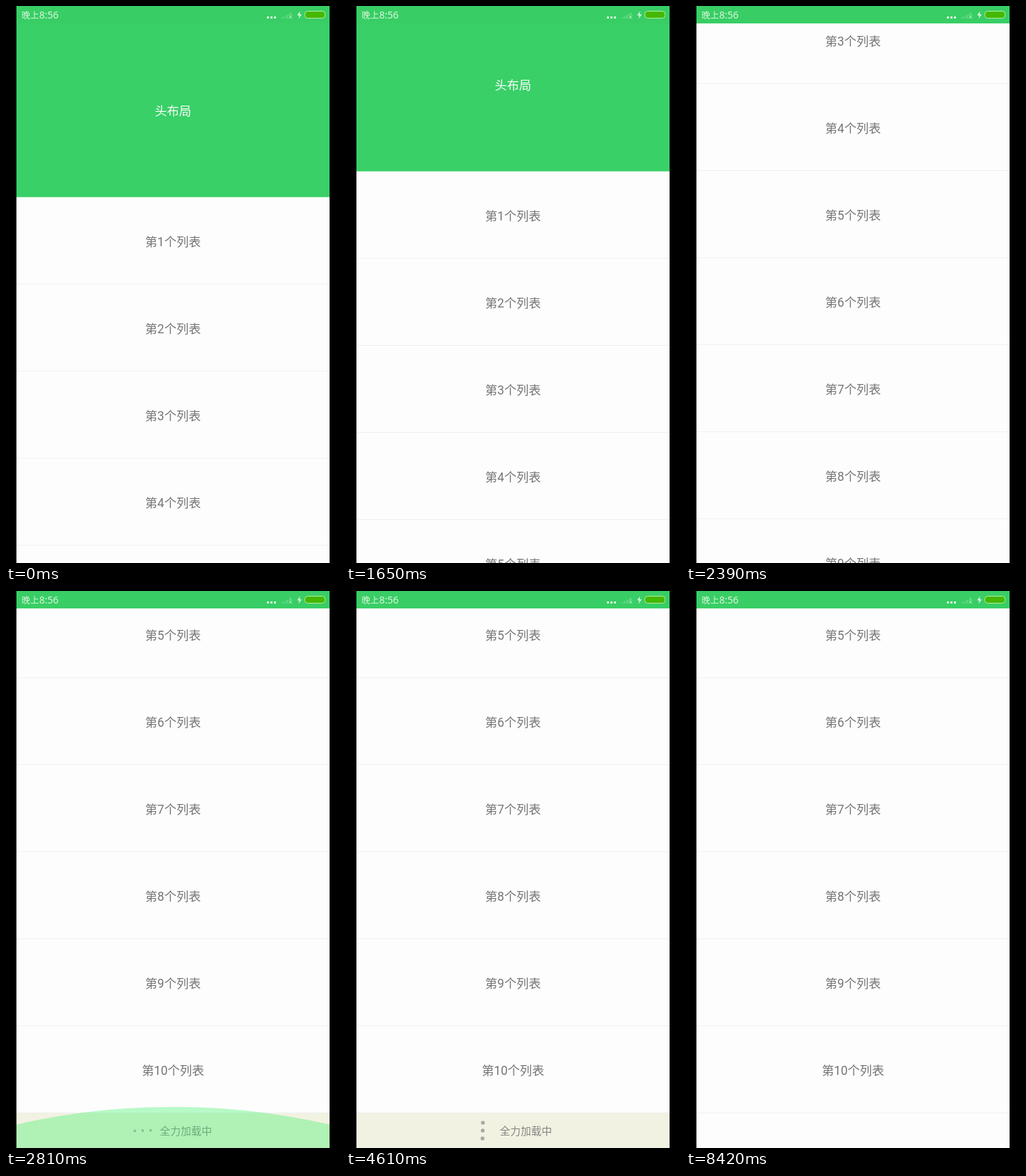
An HTML page for the animation above (8.45 s loop, 480 by 800 pixels).

```html
<!DOCTYPE html>
<html lang="zh-CN">
<head>
<meta charset="utf-8">
<title>List with loading footer</title>
<style>
  html, body { margin: 0; width: 100%; height: 100%; overflow: hidden; background: #000; }
  svg { display: block; width: 100vw; height: 100vh; }
  text { font-family: Roboto, "Noto Sans CJK SC", "Noto Sans CJK", sans-serif; }
  .row { font-size: 17.5px; text-anchor: middle; fill: #757575; }
</style>
</head>
<body>
<svg viewBox="0 0 480 800">
  <defs><clipPath id="screen"><rect x="15" width="450" height="800"/></clipPath></defs>
  <rect width="480" height="800"/>
  <g clip-path="url(#screen)">
    <rect x="15" width="450" height="800" fill="#fdfdfd"/>
    <g id="list">
      <rect x="15" width="450" height="274.500" fill="#38d067"/>
      <text class="row" x="240" y="157" style="fill:#fafdfa">头布局</text>
      <g id="rows"></g>
      <g id="footer">
        <rect x="15" y="1525" width="450" height="50" fill="#f2f2e2"/>
        <g id="dots" fill="#a8a8a8"></g>
        <text x="221" y="1555.8" font-size="15" fill="#868686">全力加载中</text>
      </g>
    </g>
    <ellipse id="glow" cx="240" rx="675" fill="#3cf068"/>
    <rect x="15" width="450" height="25" fill="#38ce65"/>
    <g fill="#dcf6dc">
      <text x="22.5" y="17.5" font-size="12.5">晚上</text>
      <text x="47.8" y="18" font-size="14" style="font-family:'Noto Sans',sans-serif">8:56</text>
      <path d="M375 15h3v3h-3zM380 15h3v3h-3zM385 15h3v3h-3z"/>
      <path d="M396 16h2v2h-2zM399.500 14.500h2v3.500h-2zM403 12.500h2v5.500h-2zM407 10h3.500v3h-3.500z" opacity=".25"/>
      <path d="M406.500 13.500l4.500 4.500m0-4.500l-4.500 4.500" stroke="#d0f2d0" fill="none"/>
      <path d="M422.500 7.500l-4 6h3l-1 5 4.500-6.500h-3z"/>
    </g>
    <rect x="429.500" y="7.500" width="29" height="10" rx="4" fill="#45b800" stroke="#b4eca0"/>
  </g>
</svg>
<script>
  const LOOP = 8450, SCROLL_END = 775, FOOTER_OFF = 8420;
  const SPIN = 1050, SPIN_START = 2858, ARM = 11.3, DOT_R = 3.75;
  const GLOW_START = 2640, GLOW_FULL = 2800, DECAY_START = 3156, DECAY = 2000;

  // time, offset, speed of the drag
  const DRAG = [[1270, 0, 0], [1650, 37, .25], [1970, 177, .65], [2640, SCROLL_END, .9]];

  const $ = id => document.getElementById(id);
  const clamp = v => Math.max(0, Math.min(1, v));

  function add(parent, tag, attrs, text) {
    const el = document.createElementNS('http://www.w3.org/2000/svg', tag);
    for (const k in attrs) el.setAttribute(k, attrs[k]);
    if (text) el.textContent = text;
    return parent.appendChild(el);
  }

  for (let i = 1; i <= 10; i++) {
    const bottom = 275 + i * 125;
    add($('rows'), 'text', { class: 'row', x: 240, y: bottom - 55.5 }, `第${i}个列表`);
    add($('rows'), 'rect', { x: 15, y: bottom - 1, width: 450, height: 1, fill: '#f0f0f0' });
  }
  const dots = [-1, 0, 1].map(side => add($('dots'), 'circle', { cx: side * ARM, cy: 0 }));

  function scrollAt(t) {
    if (t <= DRAG[0][0]) return 0;
    const i = DRAG.findIndex(p => t < p[0]);
    if (i < 0) return SCROLL_END;
    const [t0, y0, v0] = DRAG[i - 1], [t1, y1, v1] = DRAG[i];
    const d = t1 - t0, u = (t - t0) / d, w = 1 - u;
    return y0 * w * w * (1 + 2 * u) + y1 * u * u * (3 - 2 * u) + d * u * w * (v0 * w - v1 * u);
  }

  function spinDots(t) {
    const u = ((t - SPIN_START) / SPIN % 1 + 1) % 1;
    const p = (1 - Math.cos(Math.PI * u)) / 2;
    $('dots').setAttribute('transform', `translate(196.5 1550) rotate(${360 * p})`);
    const r = DOT_R * (.5 + Math.min(p, 1 - p));
    dots.forEach(dot => dot.setAttribute('r', r));
  }

  function drawGlow(t) {
    const rise = 1 - (1 - clamp((t - GLOW_START) / (GLOW_FULL - GLOW_START))) ** 2;
    const fade = (1 - clamp((t - DECAY_START) / DECAY)) ** 2;
    const k = rise * fade, scale = .656 * k;
    $('glow').setAttribute('ry', 675 * scale);
    $('glow').setAttribute('cy', 800 + 585 * scale);
    $('glow').setAttribute('opacity', .36 * k * k);
  }

  function render(t) {
    $('list').setAttribute('transform', `translate(0 ${-Math.round(scrollAt(t))})`);
    $('footer').setAttribute('visibility', t < FOOTER_OFF ? 'visible' : 'hidden');
    spinDots(t);
    drawGlow(t);
  }

  const start = performance.now();
  function tick() {
    render((performance.now() - start) % LOOP);
    requestAnimationFrame(tick);
  }
  tick();
</script>
</body>
</html>
```
